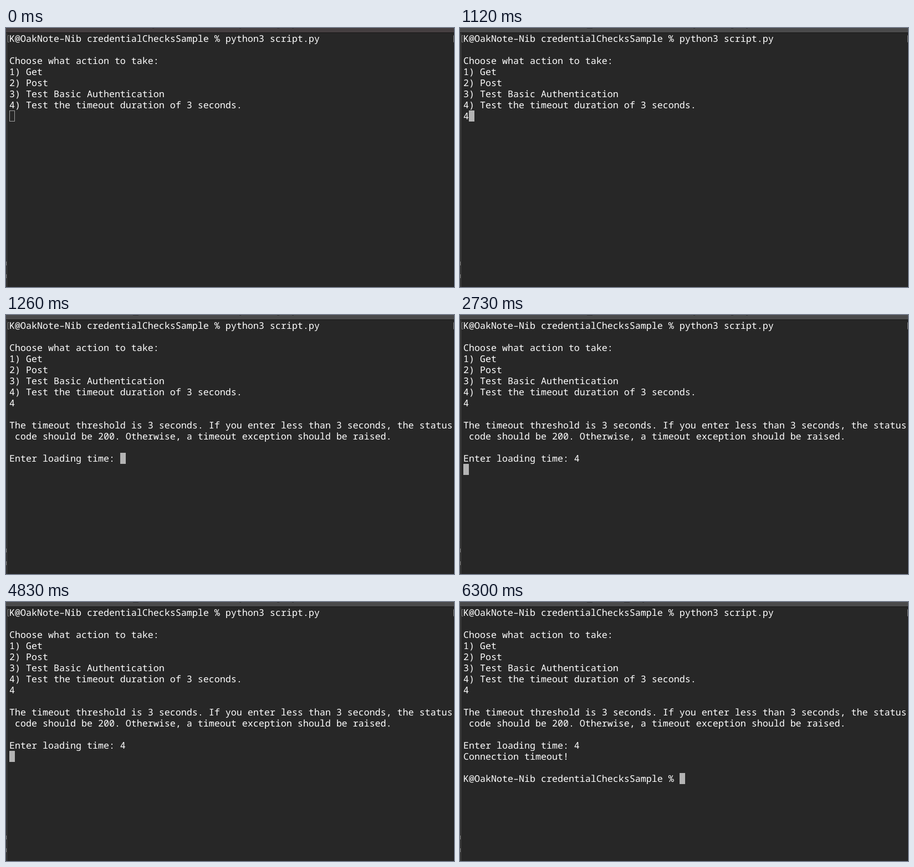
Recreate the animation shown at these times as an HTML page. Size 808x468 px, loop 7.77 s.

```html
<!DOCTYPE html>
<html lang="en">
<head>
<meta charset="utf-8">
<title>Terminal session</title>
<style>
  html, body { margin: 0; width: 100%; height: 100%; overflow: hidden; background: #272727; }
  svg { display: block; }
  text {
    font: 500 16.667px "Noto Sans Mono", "DejaVu Sans Mono", monospace;
    font-variant-ligatures: none;
    text-rendering: geometricPrecision;
    white-space: pre;
    fill: #fff;
  }
</style>
</head>
<body>
<svg id="stage" width="808" height="468" viewBox="0 0 808 468">
  <rect width="808" height="468" fill="#272727"/>
  <rect id="bar" width="808" height="8"/>
  <rect y="8" width="808" height="1" fill="#171717"/>
  <!-- lower edge of the window title -->
  <path id="title" fill="none" stroke="#303030"/>
  <!-- window edges -->
  <path d="M.5 9V468" stroke="#1c1c1c"/>
  <path d="M1.5 9V468" stroke="#505050"/>
  <path d="M.5 422V429M.5 445V452" stroke="#777"/>
  <path d="M807.5 9V468" stroke="#202020"/>
  <path d="M5.5 13.5H3.5V25.5H5.5M808 13.5H807.5V25.5H808" fill="none" stroke="#858585"/>
  <g id="lines"></g>
  <rect id="cursor"/>
</svg>
<script>
  const LOOP = 7770, CELL = 10, ROW = 20, LEFT = 6, TOP = 9;
  const $ = id => document.getElementById(id);
  const prompt = "K@OakNote–Nib credentialChecksSample % ";

  const menu = [
    prompt + "python3 script.py",
    "",
    "Choose what action to take:",
    "1) Get",
    "2) Post",
    "3) Test Basic Authentication",
    "4) Test the timeout duration of 3 seconds."
  ];
  const question = [
    ...menu, "4", "",
    "The timeout threshold is 3 seconds. If you enter less than 3 seconds, the status",
    " code should be 200. Otherwise, a timeout exception should be raised.",
    ""
  ];
  const answered = [...question, "Enter loading time: 4"];

  // The cursor sits after the last line of each screen.
  const screens = [
    [0, [...menu, ""]],
    [1120, [...menu, "4"]],
    [1260, [...question, "Enter loading time: "]],
    [2520, answered],
    [2730, [...answered, ""]],
    [6160, [...answered, "Connection timeout!", "", prompt]]
  ];

  function set(node, attrs) {
    for (const key in attrs) node.setAttribute(key, attrs[key]);
  }

  function showLines(lines) {
    $("lines").replaceChildren(...lines.map((line, i) => {
      const node = document.createElementNS("http://www.w3.org/2000/svg", "text");
      set(node, { x: LEFT, y: TOP + i * ROW + 16 });
      node.textContent = line;
      return node;
    }));
  }

  function showCursor(lines, focused) {
    const row = lines.length - 1;
    const inset = focused ? 0 : 0.5;
    set($("cursor"), {
      x: LEFT + lines[row].length * CELL + inset,
      y: TOP + row * ROW + inset,
      width: CELL - 2 * inset,
      height: ROW - 2 * inset,
      fill: focused ? "#b4b4b4" : "none",
      stroke: focused ? "none" : "#a0a0a0"
    });
  }

  // The title bar brightens in five steps as the window gains focus.
  function showBar(t) {
    const k = Math.min(5, Math.floor(t / 70)) / 5;
    const mix = (a, b) => Math.round(a + (b - a) * k);
    set($("bar"), { fill: `rgb(${mix(69, 74)},${mix(63, 74)},${mix(65, 75)})` });
    const marks = t < 70 ? "M264 .5h3M421 .5h3M489 .5h4M516 .5h3"
      : t < 6300 ? "M229 .5h10M421 .5h3M489 .5h4M516 .5h3"
      : "M229 .5h10M296 .5h10M329 .5h3";
    set($("title"), { d: marks });
  }

  let shown = null;
  const start = performance.now();

  function frame() {
    const t = (performance.now() - start) % LOOP;
    const lines = screens.filter(([at]) => at <= t).pop()[1];
    if (lines !== shown) showLines(shown = lines);
    showCursor(lines, t >= 70);
    showBar(t);
    requestAnimationFrame(frame);
  }
  frame();
</script>
</body>
</html>
```
